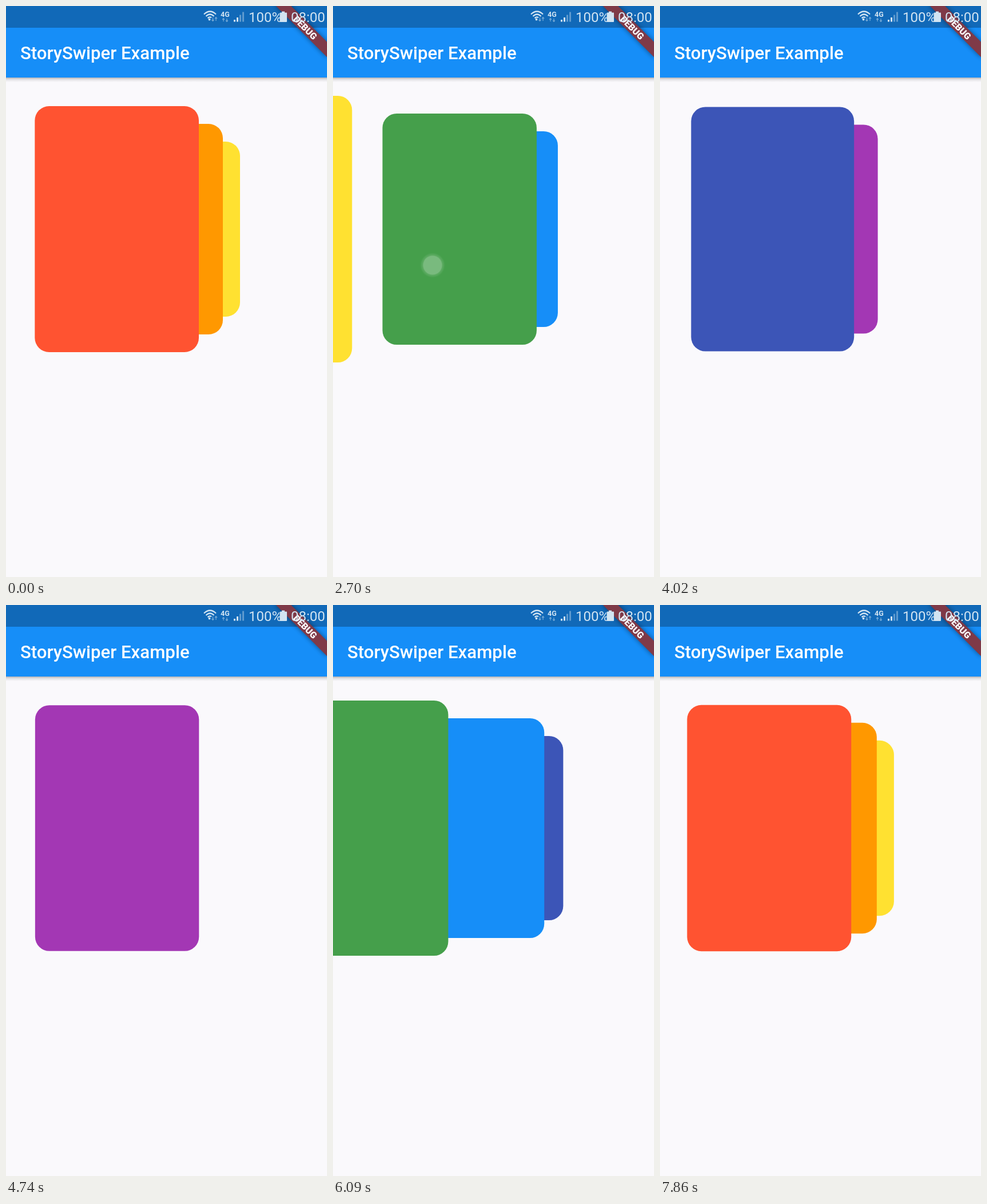
An HTML page for the animation above (8250 ms loop, 561 by 998 pixels).

```html
<!DOCTYPE html>
<html lang="en">
<head>
<meta charset="utf-8">
<title>StorySwiper Example</title>
<style>
  html, body { margin: 0; width: 100%; height: 100%; overflow: hidden; background: #faf9fc; }
  svg { display: block; width: 561px; height: 998px; }
  text { font-family: Roboto, "Open Sans", sans-serif; fill: #fff; }
  .title { font-size: 31.2px; font-weight: 500; }
  .status { font-size: 24px; font-stretch: 83%; fill: #d2e4f2; }
  .net { font-size: 12.5px; font-weight: 700; fill: #d2e4f2; }
  .debug { font-size: 15.9px; font-weight: 900; text-anchor: middle; }
</style>
</head>
<body>
<svg viewBox="0 0 561 998">
  <defs>
    <linearGradient id="drop" x2="0" y2="1">
      <stop offset="0" stop-color="#000" stop-opacity=".28"/>
      <stop offset=".4" stop-color="#000" stop-opacity=".1"/>
      <stop offset="1" stop-color="#000" stop-opacity="0"/>
    </linearGradient>
    <radialGradient id="halo">
      <stop offset=".7" stop-color="#fff" stop-opacity=".55"/>
      <stop offset="1" stop-color="#fff" stop-opacity="0"/>
    </radialGradient>
    <filter id="blur" x="-20%" y="-100%" width="140%" height="300%">
      <feGaussianBlur stdDeviation="4"/>
    </filter>
  </defs>

  <rect width="561" height="998" fill="#faf9fc"/>
  <g id="cards"></g>

  <rect y="125" width="561" height="8" fill="url(#drop)"/>
  <rect width="561" height="125" fill="#168ef8"/>
  <rect width="561" height="38" fill="#1169b8"/>
  <text class="title" x="25" y="93">StorySwiper Example</text>

  <g transform="translate(561 0) rotate(45)">
    <rect x="-63" y="44.4" width="126" height="18.7" opacity=".45" filter="url(#blur)"/>
    <rect x="-63" y="44.4" width="126" height="18.7" fill="#7f3a48"/>
    <text class="debug" x="0" y="59.4">DEBUG</text>
  </g>

  <g fill="none" stroke="#d2e4f2" stroke-width="2.2">
    <path d="M346 14.5Q356.500 4.500 367 14.500M349.500 18Q356.500 11 363.500 18"/>
    <path d="M352.500 21.300Q356 18 359 20.500"/>
  </g>
  <circle cx="355.500" cy="23.500" r="1.900" fill="#d2e4f2"/>
  <g fill="none" stroke="#75a9d6" stroke-width="1.300">
    <path d="M361.500 20v6m-2-2l2 2.200l2-2.200M367 26v-6m-2 2l2-2.200l2 2.200"/>
    <path d="M380 27v-5m-1.800 1.800l1.800-2l1.800 2M386 22v5m-1.800-1.800l1.800 2l1.800-2"/>
  </g>
  <text class="net" x="375" y="19">4G</text>
  <g fill="#d2e4f2">
    <path d="M398 24h3v3.500h-3zM403 20h3v7.500h-3z"/>
    <path d="M408 15.500h3v12h-3zM413 10.500h3v17h-3z" opacity=".4"/>
    <path d="M482 9.500h5v2h3q1 0 1 1v14.500q0 1-1 1h-10.500q-1 0-1-1v-14.500q0-1 1-1h2.500z"/>
  </g>
  <text class="status" x="424" y="27.500">100%</text>
  <text class="status" x="498" y="27.500">08:00</text>

  <g id="finger" opacity="0">
    <circle r="22" fill="url(#halo)"/>
    <circle r="16.500" fill="#fff" fill-opacity=".65"/>
  </g>
</svg>
<script>
  const LOOP = 8250, STEP = 30;
  const COLORS = ['#ff5331', '#ff9800', '#ffe131', '#459f4b', '#168ef8', '#3c55b7', '#a337b4'];

  // Each swipe: start time; dir +1 goes to the next card, -1 to the previous one
  const swipes = [
    ...[1210, 1845, 2480, 3040, 3590, 4140].map(start => ({ start, dir: 1, speed: 1 })),
    ...[5010, 5460, 5850, 6240, 6780, 7310].map(start => ({ start, dir: -1, speed: 1.125 }))
  ];
  const SLOP = 40, RELEASE = 150, DRAGGED = 0.3;

  const group = document.getElementById('cards');
  const finger = document.getElementById('finger');
  const cards = COLORS.map(fill => {
    const card = document.createElementNS('http://www.w3.org/2000/svg', 'rect');
    card.setAttribute('fill', fill);
    card.setAttribute('rx', 25);
    group.prepend(card);
    return card;
  });

  const set = (el, attrs) => {
    for (const key in attrs) el.setAttribute(key, attrs[key]);
  };

  // Share of one page turned: drag by hand, then a critically damped spring
  function turned(ms) {
    if (ms <= SLOP) return 0;
    if (ms < RELEASE) return DRAGGED * ((ms - SLOP) / (RELEASE - SLOP)) ** 1.43;
    const s = (ms - RELEASE) / 1000;
    const rest = (1 - DRAGGED + 6 * s) * Math.exp(-14.14 * s);
    return rest < 0.004 ? 1 : 1 - rest;
  }

  function drawCard(card, d) {
    const shown = d > -1.2 && d <= 2.001;
    card.setAttribute('visibility', shown ? 'visible' : 'hidden');
    if (!shown) return;
    const height = 430 - 62 * d, width = height * 2 / 3;
    const x = d < 0 ? 50 + 561 * d : 337 + 48 * d - 6 * d * d - width;
    set(card, { x, y: 390 - height / 2, width, height });
  }

  function drawFinger(t) {
    const swipe = swipes.filter(s => s.start <= t).pop();
    const ms = swipe ? (t - swipe.start) * swipe.speed : Infinity;
    const opacity = ms < RELEASE ? 1 : Math.max(0, 1 - (ms - RELEASE) / 105);
    finger.setAttribute('opacity', opacity);
    if (!opacity) return;
    const u = Math.min(1, ms / 140) ** 1.5;
    const [x0, x1, y0, y1] = swipe.dir > 0 ? [385, 174, 485, 453] : [258, 395, 488, 478];
    finger.setAttribute('transform', `translate(${x0 + (x1 - x0) * u} ${y0 + (y1 - y0) * u})`);
  }

  function draw(now) {
    const t = Math.floor((now % LOOP) / STEP) * STEP;
    const page = swipes.reduce((sum, s) => sum + s.dir * turned((t - s.start) * s.speed), 0);
    cards.forEach((card, i) => drawCard(card, i - page));
    drawFinger(t);
  }

  let begin;
  function frame(now) {
    begin ??= now;
    draw(now - begin);
    requestAnimationFrame(frame);
  }
  draw(0);
  requestAnimationFrame(frame);
</script>
</body>
</html>
```
